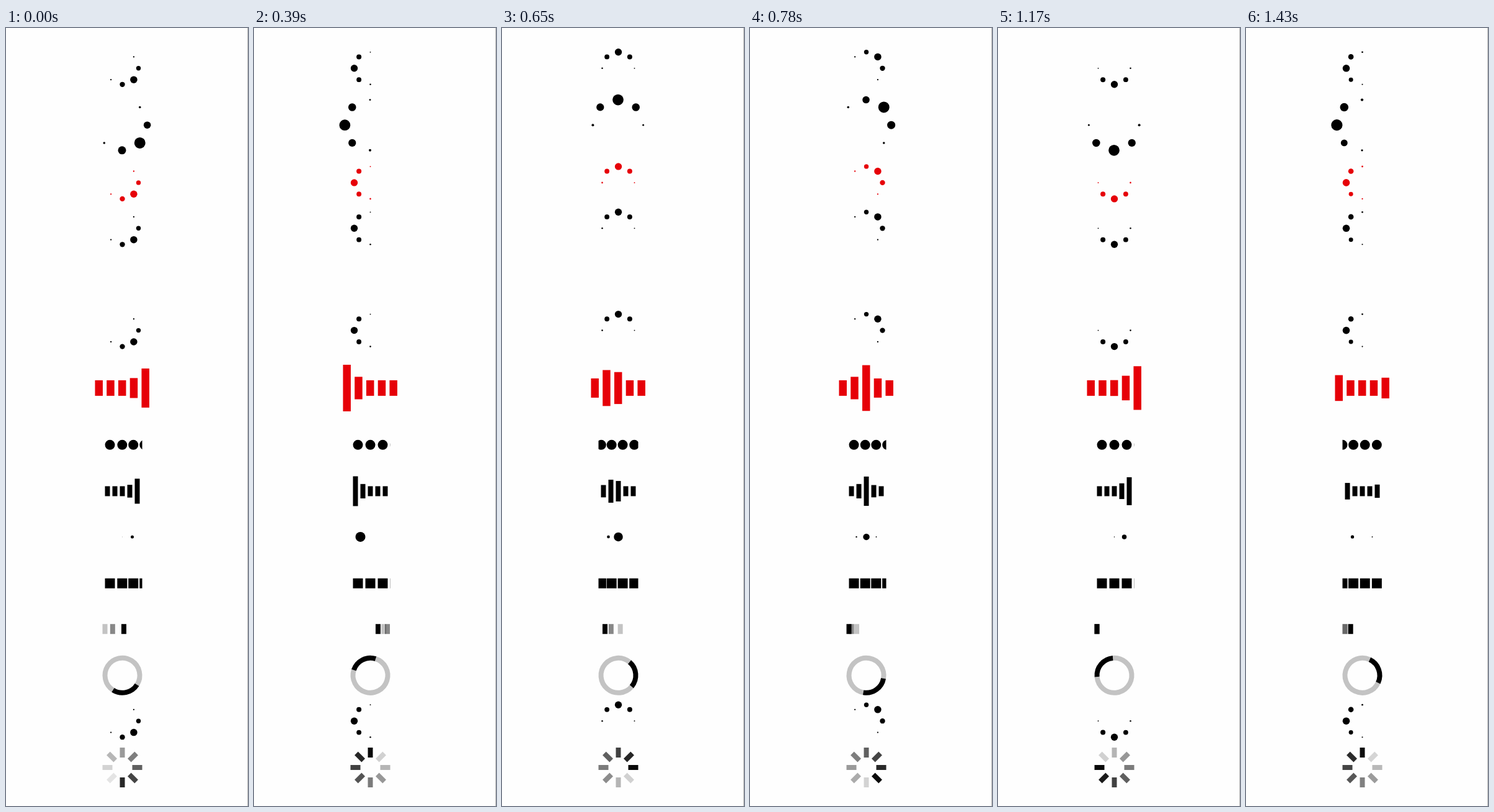
Recreate the animation shown at these times as an HTML page with a canvas. Size 390 by 1252 pixels, loop 1.56 s.

```html
<!DOCTYPE html>
<html lang="en">
<head>
<meta charset="utf-8">
<title>Loaders</title>
<style>
  html, body { margin: 0; width: 100%; height: 100%; overflow: hidden; background: #fefefe; }
  canvas { display: block; }
</style>
</head>
<body>
<canvas id="stage" width="390" height="1252"></canvas>
<script>
const ctx = document.getElementById('stage').getContext('2d');
const RED = '#e60008', BLACK = '#000';
const HOLD = 130;      // ms each pose stays
const START = 10.6725; // loader clock at the first pose, in seconds
const TICKS = [0, 8, 15, 22, 30, 37, 45, 53, 60, 67, 75, 83]; // pose times in 1/60 s

function bezier(x1, y1, x2, y2) {
  const at = (a, b, s) => 3 * a * s * (1 - s) ** 2 + 3 * b * s * s * (1 - s) + s ** 3;
  return x => {
    let lo = 0, hi = 1;
    for (let i = 0; i < 24; i++) {
      const mid = (lo + hi) / 2;
      if (at(x1, x2, mid) < x) lo = mid; else hi = mid;
    }
    return at(y1, y2, lo);
  };
}
const soft = bezier(.2, .2, .4, .8);
const quick = bezier(.2, .6, .4, .8);

const phase = (t, period) => (t / period % 1 + 1) % 1;

// Rises 0..1 until `peak`, returns to 0 at `end`, then rests.
function pulse(p, peak, end, fall) {
  if (p < peak) return soft(p / peak);
  return p < end ? 1 - fall((p - peak) / (end - peak)) : 0;
}

function dot(x, y, r) {
  ctx.beginPath();
  ctx.arc(x, y, r, 0, 7);
  ctx.fill();
}

// All loaders are drawn on a 32 x 32 grid.
function spinningBubbles(t) {
  for (let i = 0; i < 8; i++) {
    const a = i * Math.PI / 4;
    const r = 3 * pulse(phase(t - i / 8, 1), 1 / 3, 2 / 3, soft);
    dot(16 + 13 * Math.sin(a), 16 - 13 * Math.cos(a), r);
  }
}

function bars(t) {
  for (let i = 0; i < 5; i++) {
    const h = 8 + 16 * pulse(phase(t - i * .2, 1.2), .2, .5, quick);
    ctx.fillRect(2 + 6 * i, 16 - h / 2, 4, h);
  }
}

function conveyor(t, shape) {
  ctx.beginPath();
  ctx.rect(0, 0, 32, 32);
  ctx.clip();
  const p = phase(t, .8);
  for (let i = 0; i < 4; i++) {
    shape(-8 + 10 * i + 10 * soft(Math.min(1, p / (.25 + .1 * i))));
  }
}
const balls = t => conveyor(t, x => dot(x + 4, 16, 4));
const cubes = t => conveyor(t, x => ctx.fillRect(x, 12, 8, 8));

function bubbles(t) {
  for (let i = 0; i < 3; i++) {
    dot(8 + 8 * i, 16, 4 * pulse(phase(t - i * .3, 1.2), .2, .7, quick));
  }
}

function cylon(t) {
  [1, .47, .23].forEach((alpha, i) => {
    ctx.globalAlpha = alpha;
    ctx.fillRect(28 * pulse(phase(t - i * .1, 1.5), .3, .6, soft), 12, 4, 8);
  });
}

function ring(t) {
  const arc = (from, to, alpha) => {
    ctx.globalAlpha = alpha;
    ctx.beginPath();
    ctx.arc(16, 16, 14, from, to);
    ctx.stroke();
  };
  const a = (phase(t, .8) - .25) * 2 * Math.PI;
  ctx.lineWidth = 4;
  arc(a + Math.PI / 2, a + 2 * Math.PI, .23);
  arc(a, a + Math.PI / 2, 1);
}

function spokes(t) {
  ctx.translate(16, 16);
  [0, .125, .25, .375, .5, .675, .75, .875].forEach(begin => {
    ctx.globalAlpha = 1 - .9 * phase(t - begin, 1);
    ctx.fillRect(-2, -16, 4, 8);
    ctx.rotate(Math.PI / 4);
  });
}

// loader, centre y, colour, size, centre x
const LOADERS = [
  [spinningBubbles, 64.8],
  [spinningBubbles, 156.2, BLACK, 100, 187],
  [spinningBubbles, 248.9, RED],
  [spinningBubbles, 322.3],
  [spinningBubbles, 486.6],
  [bars, 579.4, RED, 100, 187.2],
  [balls, 670.8],
  [bars, 745.4],
  [bubbles, 818.9],
  [cubes, 893.7],
  [cylon, 967.2],
  [ring, 1041.8],
  [spinningBubbles, 1115.2],
  [spokes, 1190]
];

function draw(now) {
  const t = START + TICKS[Math.floor(now / HOLD) % TICKS.length] / 60;
  ctx.fillStyle = '#fefefe';
  ctx.fillRect(0, 0, 390, 1252);
  ctx.fillStyle = '#b4b4b4';
  ctx.fillRect(389, 0, 1, 1252);
  for (const [loader, y, color = BLACK, size = 64, x = 187.5] of LOADERS) {
    ctx.save();
    ctx.translate(x - size / 2, y - size / 2);
    ctx.scale(size / 32, size / 32);
    ctx.fillStyle = ctx.strokeStyle = color;
    loader(t);
    ctx.restore();
  }
}

const begin = performance.now();
function loop() {
  draw(performance.now() - begin);
  requestAnimationFrame(loop);
}
loop();
</script>
</body>
</html>
```
